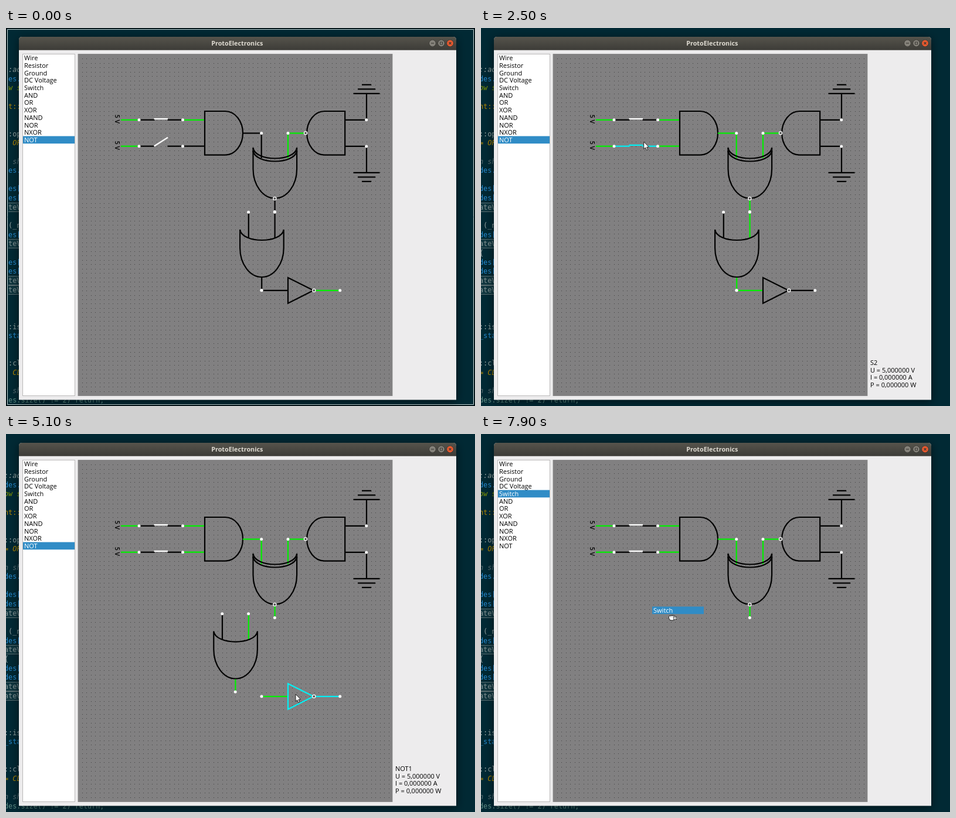
Animation of 800 by 645 pixels, one loop 8 s. Source, as an HTML page with a canvas:

```html
<!DOCTYPE html>
<html lang="en">
<head>
<meta charset="utf-8">
<title>Logic circuit editor</title>
<style>
html, body { margin: 0; width: 100%; height: 100%; overflow: hidden; background: #012731; }
canvas { display: block; }
</style>
</head>
<body>
<canvas id="stage" width="800" height="645"></canvas>
<script>
const ctx = document.getElementById('stage').getContext('2d');
const LOOP = 8000, STEP = 100, GRID = 7.47;
const BLACK = '#000', GREEN = '#00f000', CYAN = '#00f0f5', WHITE = '#fff', BLUE = '#308cc6';
const UI = '500 11px "Open Sans", "Noto Sans", sans-serif';
const PARTS = ['Wire', 'Resistor', 'Ground', 'DC Voltage', 'Switch', 'AND', 'OR', 'XOR',
  'NAND', 'NOR', 'NXOR', 'NOT'];

// Pointer path: time, x, y
const POINTER = [
  [100, 450, 655], [500, 330, 225], [600, 330, 225], [1000, 262, 150], [1700, 262, 150],
  [2200, 280, 194], [2400, 280, 194], [2900, 258, 196], [3700, 258, 196], [4000, 434, 363],
  [4400, 389, 355], [4500, 389, 355], [5000, 494, 444], [5400, 494, 444], [5800, 405, 364],
  [6300, 405, 364], [7200, 64, 101], [7400, 64, 101], [7900, 327, 301]
];
const GRAB = [434, 363];

// Selection changes: time, part
const SELECTED = [[0, ''], [1000, 'S1'], [2200, 'S2'], [4000, 'OR1'], [5100, 'NOT1'], [5700, 'OR1'], [6400, '']];

// Editor lines behind the window: y, text, colour, italic, boxed
const CODE = [
  [71, '::add', '#93a1a1', 1], [87, 'des.', '#268bd2'], [102, 'ow s', '#859900', 1],
  [134, 'nt::', '#b58900'], [181, '::op', '#93a1a1'], [196, '= OP', '#b58900', 1],
  [228, 'n sh', '#586e75', 1], [243, 'des.', '#268bd2'], [274, 'des[', '#268bd2'],
  [290, 'des[', '#268bd2'], [306, 'ateV', '#839496', 0, 1], [337, ' (_n', '#93a1a1'],
  [353, 'des[', '#268bd2'], [368, 'ateV', '#839496', 0, 1], [384, '{', '#93a1a1'],
  [400, 'des[', '#268bd2'], [415, 'des[', '#268bd2'], [431, 'ateV', '#839496', 0, 1],
  [447, 'ateV', '#839496', 0, 1], [510, '::is', '#93a1a1'], [525, '_sta', '#268bd2'],
  [572, '::cl', '#93a1a1'], [588, '= CL', '#b58900', 1], [619, 'n sh', '#586e75', 1],
  [635, 'des.size() != 2) return;', '#5f8d84']
];

function pointerAt(t) {
  if (t <= POINTER[0][0]) return null;
  const i = POINTER.findIndex(k => k[0] >= t);
  if (i < 0) return POINTER[POINTER.length - 1].slice(1);
  const [t0, x0, y0] = POINTER[i - 1], [t1, x1, y1] = POINTER[i];
  const p = (t - t0) / (t1 - t0), e = p * p * (3 - 2 * p);
  return [x0 + (x1 - x0) * e, y0 + (y1 - y0) * e];
}

function stateAt(t) {
  const sel = SELECTED.filter(s => s[0] <= t).pop()[1];
  const s1 = t < 1000 || t >= 1700, s2 = t >= 2200;
  const pointer = pointerAt(t);
  let shift = [0, 0];
  if (t >= 4000) {
    const at = t < 4500 ? pointer : [389, 355];
    shift = at.map((v, i) => Math.round((v - GRAB[i]) / GRID) * GRID);
  }
  return { t, sel, s1, s2, pointer, shift, high: s1 && s2, hasNot: t < 5400, hasOr: t < 6400 };
}

function rect(x, y, w, h, color) {
  ctx.fillStyle = color;
  ctx.fillRect(x, y, w, h);
}

function text(s, x, y, color, font = UI) {
  ctx.font = font;
  ctx.fillStyle = color;
  ctx.fillText(s, x, y);
}

function stroke(color, draw, width = 2.2) {
  ctx.beginPath();
  draw();
  ctx.strokeStyle = color;
  ctx.lineWidth = width;
  ctx.stroke();
}

function line(x0, y0, x1, y1, color = BLACK) {
  stroke(color, () => { ctx.moveTo(x0, y0); ctx.lineTo(x1, y1); });
}

function disc(x, y, r, color) {
  ctx.beginPath();
  ctx.arc(x, y, r, 0, 7);
  ctx.fillStyle = color;
  ctx.fill();
}

const node = (x, y) => disc(x, y, 2.5, WHITE);

function bubble(x, y) {
  disc(x, y, 2.8, '#555');
  stroke(WHITE, () => ctx.arc(x, y, 2.6, 0, 7), 1.3);
}

const tint = (live, picked) => live ? GREEN : picked ? CYAN : BLACK;

function drawDesktop(t) {
  rect(0, 0, 800, 645, '#012934');
  for (const [y, s, color, italic, box] of CODE) {
    if (box) {
      rect(0, y - 7, 30, 14, '#10363f');
      stroke('#5b6f73', () => ctx.rect(-4, y - 7.5, 40, 15), 1);
    }
    text(s, -3, y + 4, color, (italic ? 'italic ' : '') + '11.8px "DejaVu Sans Mono", monospace');
  }
  if (t < 100) {
    rect(0, 0, 4, 645, '#012934');
    stroke('#000', () => ctx.rect(0.5, 0.5, 799, 644), 1);
    stroke('#c5cdca', () => ctx.rect(2.5, 2.5, 795, 640), 1);
  }
}

function drawWindow() {
  ctx.save();
  ctx.shadowColor = 'rgba(0,0,0,.55)';
  ctx.shadowBlur = 16;
  ctx.shadowOffsetY = 3;
  ctx.beginPath();
  ctx.roundRect(22, 15, 746, 619.5, [5, 5, 0, 0]);
  ctx.fillStyle = '#edeced';
  ctx.fill();
  ctx.restore();

  const bar = ctx.createLinearGradient(0, 15, 0, 38);
  bar.addColorStop(0, '#56544c');
  bar.addColorStop(1, '#3c3b37');
  ctx.beginPath();
  ctx.roundRect(22, 15, 746, 22.7, [5, 5, 0, 0]);
  ctx.fillStyle = bar;
  ctx.fill();
  ctx.textAlign = 'center';
  text('ProtoElectronics', 394.3, 30, '#dfdbd2', 'bold 10.8px "Open Sans", "Noto Sans", sans-serif');
  ctx.textAlign = 'left';

  for (const x of [727.5, 742.5, 757.5]) {
    disc(x, 26, 6, '#34332f');
    disc(x, 26, 5.4, x > 750 ? '#ea5a2f' : '#85827a');
  }
  const ink = '#3b3934';
  stroke(ink, () => { ctx.moveTo(725, 26); ctx.lineTo(730, 26); }, 1.1);
  stroke(ink, () => ctx.rect(740.5, 24, 4, 4), 1.1);
  stroke(ink, () => {
    ctx.moveTo(755.5, 24); ctx.lineTo(759.5, 28);
    ctx.moveTo(759.5, 24); ctx.lineTo(755.5, 28);
  }, 1.1);
}

function drawList(t) {
  rect(28, 44, 90, 584, '#b9b8b8');
  rect(29, 45, 88, 582, WHITE);
  const current = PARTS.indexOf(t < 7400 ? 'NOT' : 'Switch');
  PARTS.forEach((name, i) => {
    const y = 51.2 + i * 12.7;
    if (i === current) rect(29, y - 6.4, 88, 12.7, BLUE);
    text(name, 31, y + 4, i === current ? WHITE : BLACK);
  });
}

function drawBoard() {
  rect(122.5, 44, 537, 584, '#9a9a9a');
  rect(123, 44.5, 536, 583, '#818081');
  ctx.fillStyle = 'rgba(0,0,0,.5)';
  for (let i = 1; i < 72; i++)
    for (let j = 1; j < 78; j++)
      ctx.fillRect(Math.round(122.3 + i * GRID), Math.round(44.7 + j * GRID), 1, 1);
}

function drawSource(y) {
  ctx.save();
  ctx.translate(185.5, y - 9);
  ctx.rotate(Math.PI / 2);
  text('5 V', 0, 0, BLACK, '600 10.5px "Open Sans", "Noto Sans", sans-serif');
  ctx.restore();
  line(196, y, 227, y, GREEN);
}

function drawSwitch(y, closed, picked) {
  const color = tint(false, picked);
  line(227, y, 253.5, y, color);
  line(275.5, y, 301.5, y, color);
  const arm = picked ? CYAN : WHITE;
  if (closed) line(252.5, y - 1.8, 276, y - 1.8, arm);
  else line(252.5, y, 276, y - 15, arm);
  line(301.5, y, 338, y, tint(closed));
  node(227, y);
  node(301.5, y);
}

function drawGround(y, dir) {
  line(579, y, 615, y);
  line(615, y, 615, y + 45 * dir);
  [22.5, 15, 8].forEach((half, i) => {
    const by = y + dir * (45 + i * 7.5);
    line(615 - half, by, 615 + half, by);
  });
  node(614.7, y);
}

// D-shaped body with its flat side at x; dir is the way it points
function drawAnd(x, dir) {
  const cx = x + 35 * dir;
  stroke(BLACK, () => {
    ctx.moveTo(cx, 142);
    ctx.lineTo(x, 142);
    ctx.lineTo(x, 216.7);
    ctx.lineTo(cx, 216.7);
    ctx.ellipse(cx, 179.35, 30, 37.35, 0, Math.PI / 2, -Math.PI / 2, dir > 0);
  });
}

function hollow(x, y) {
  ctx.moveTo(x - 37.3, y);
  ctx.bezierCurveTo(x - 34, y + 24, x + 34, y + 24, x + 37.3, y);
}

function shield(x, y, color) {
  stroke(color, () => {
    hollow(x, y);
    ctx.lineTo(x + 37.3, y + 31);
    ctx.ellipse(x, y + 31, 37.3, 50, 0, 0, Math.PI);
    ctx.closePath();
  });
}

function drawXor(high) {
  line(404, 179.5, 435.7, 179.5, tint(high));
  line(435.7, 179.5, 435.7, 222, tint(high));
  line(511, 179.5, 481, 179.5, GREEN);
  line(481, 179.5, 481, 222, GREEN);
  node(435.7, 179.5);
  node(481, 179.5);
  bubble(511, 179.3);
  stroke(BLACK, () => hollow(458.8, 204.5));
  shield(458.8, 209.5, BLACK);
  line(421.5, 204, 421.5, 212);
  line(496.1, 204, 496.1, 212);
  line(458.6, 293, 458.6, 313.5, tint(high));
  bubble(458.4, 291);
  node(458.4, 313.5);
}

function drawOr(s) {
  const picked = s.sel === 'OR1', live = s.high && s.hasNot;
  ctx.save();
  ctx.translate(...s.shift);
  line(413.8, 314, 413.8, 358, tint(false, picked));
  line(458.6, 314, 458.6, 358, tint(live, picked));
  shield(436.4, 344, tint(false, picked));
  line(436.2, 426, 436.2, 447.7, tint(live, picked));
  node(413.6, 314.2);
  node(458.4, 314.2);
  node(436, 447.5);
  ctx.restore();
}

function drawNot(s) {
  const picked = s.sel === 'NOT1';
  line(436, 447.8, 481, 447.8, tint(s.high, picked));
  line(526, 447.8, 569.5, 447.8, tint(!s.high, picked));
  stroke(tint(false, picked), () => {
    ctx.moveTo(481, 426);
    ctx.lineTo(524.5, 447.8);
    ctx.lineTo(481, 469.8);
    ctx.closePath();
  });
  bubble(525.3, 447.8);
  node(436, 447.8);
  node(569.7, 447.8);
}

function drawCircuit(s) {
  drawSource(156.8);
  drawSource(201.7);
  drawSwitch(156.8, s.s1, s.sel === 'S1');
  drawSwitch(201.7, s.s2, s.sel === 'S2');
  drawAnd(339, 1);
  drawAnd(578.2, -1);
  drawGround(156.8, -1);
  drawGround(201.9, 1);
  drawXor(s.high);
  if (s.hasNot) drawNot(s);
  if (s.hasOr) drawOr(s);
}

function drawInfo(s) {
  if (!s.sel) return;
  const volts = s.hasNot ? 5 : 0;
  [s.sel, `U = ${volts},000000 V`, 'I = 0,000000 A', 'P = 0,000000 W']
    .forEach((row, i) => text(row, 664, 575 + i * 12.7, BLACK));
}

function drawArrow(x, y) {
  ctx.save();
  ctx.translate(x, y);
  ctx.beginPath();
  [[0, 0], [0, 12.3], [2.8, 9.8], [4.9, 14.4], [6.9, 13.5], [4.9, 9.1], [8.6, 8.8]]
    .forEach(p => ctx.lineTo(...p));
  ctx.closePath();
  ctx.fillStyle = WHITE;
  ctx.fill();
  ctx.strokeStyle = '#111';
  ctx.lineWidth = 0.9;
  ctx.stroke();
  ctx.restore();
}

function drawDrag(x, y) {
  rect(x - 35, y - 6.5, 88, 12.7, BLUE);
  text('Switch', x - 33, y + 4, WHITE);
  // Closed hand with a plus badge
  ctx.beginPath();
  ctx.roundRect(x - 6.5, y + 8.5, 11, 8.5, [3, 3, 4, 4]);
  ctx.fillStyle = WHITE;
  ctx.fill();
  ctx.strokeStyle = '#111';
  ctx.lineWidth = 1;
  ctx.stroke();
  for (const dx of [-3.5, -1, 1.5])
    stroke('#333', () => { ctx.moveTo(x + dx, y + 9); ctx.lineTo(x + dx, y + 11.5); }, 0.7);
  const plus = () => {
    ctx.moveTo(x + 0.8, y + 13.3); ctx.lineTo(x + 6.8, y + 13.3);
    ctx.moveTo(x + 3.8, y + 10.3); ctx.lineTo(x + 3.8, y + 16.3);
  };
  stroke('#111', plus, 3.4);
  stroke(WHITE, plus, 1.4);
}

function draw(t) {
  const s = stateAt(t);
  drawDesktop(t);
  drawWindow();
  drawList(t);
  drawBoard();
  drawCircuit(s);
  drawInfo(s);
  if (s.pointer) (t > 7400 ? drawDrag : drawArrow)(...s.pointer);
}

const start = performance.now();
function tick() {
  const t = (performance.now() - start) % LOOP;
  draw(Math.floor(t / STEP) * STEP);
  requestAnimationFrame(tick);
}
tick();
</script>
</body>
</html>
```
